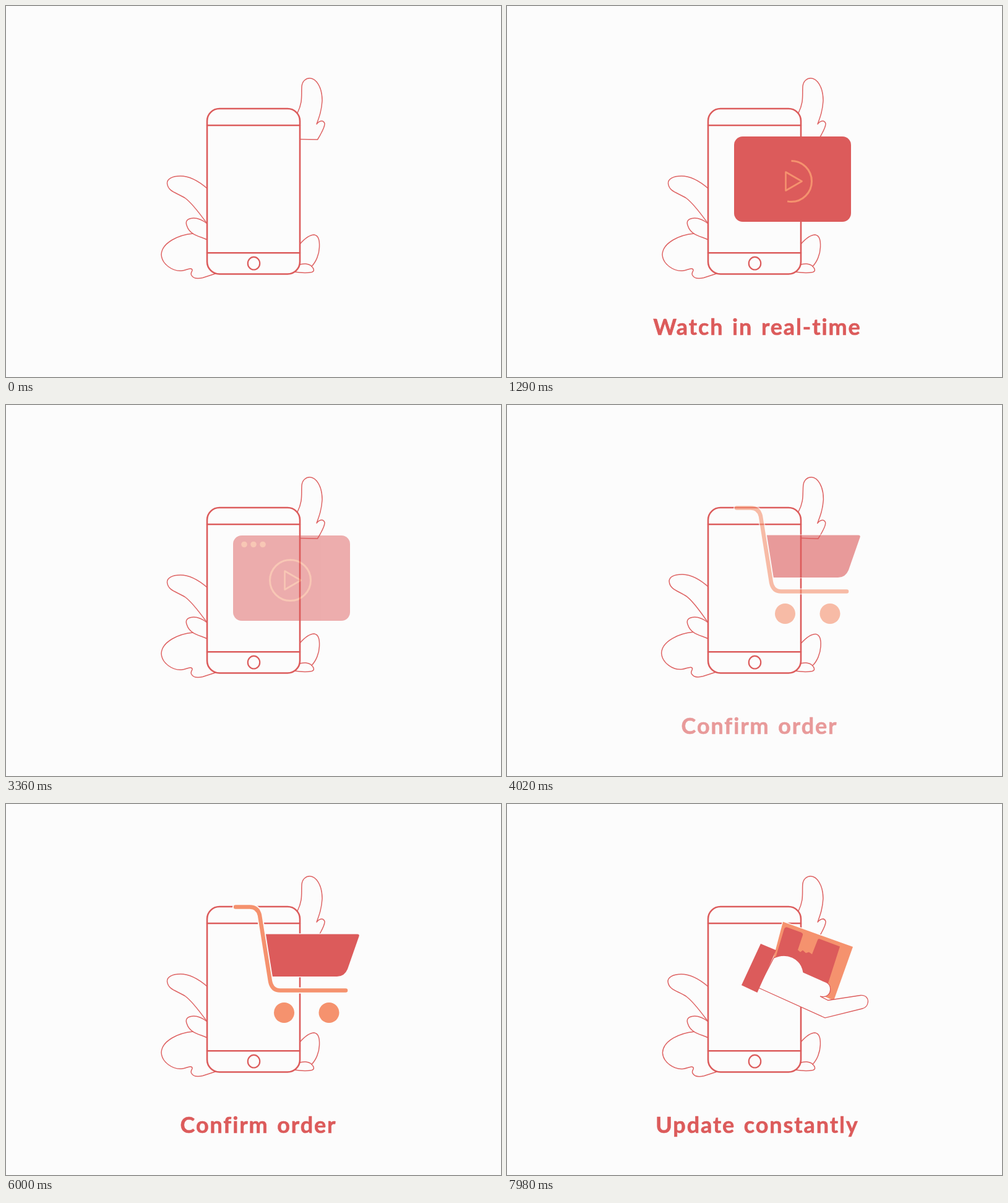
An HTML page for the animation above (8000 ms loop, 800x600 px).

```html
<!DOCTYPE html>
<html lang="en">
<head>
<meta charset="utf-8">
<style>
  html, body { margin: 0; width: 100%; height: 100%; overflow: hidden; background: #fcfcfc; }
  svg { display: block; width: 800px; height: 600px; }
  .line { fill: none; stroke: #de6363; stroke-linejoin: round; stroke-linecap: round; }
  .leaf { stroke-width: 1.5; }
  .phone { stroke-width: 2.6; stroke: #dc5c5c; }
  .paper { fill: #fcfcfc; }
  .red { fill: #dc5b5b; }
  .orange { fill: #f5926e; }
  .halo { stroke: #fcfcfc; stroke-width: 2.5; paint-order: stroke; }
  .icon { fill: none; stroke: #f5926e; stroke-linejoin: round; }
  text { font: 700 36px Lato, "Open Sans", sans-serif; letter-spacing: 1.9px; word-spacing: 3px;
    text-anchor: middle; fill: #dc5b5b; stroke: #dc5b5b; stroke-width: .6; stroke-linejoin: round; }
</style>
</head>
<body>
<svg viewBox="0 0 800 600">
  <g class="line leaf">
    <path id="topLeaf" d="M471 173C480 155 477 145 478 130C479 121 485 116.8 491 116.8C501 117 511 131 511 153C510 170 506 180 502 191C507 185 513 184 515 190C515.5 196 509 207 503.500 216L475 215.500"/>
    <path id="leftLeaf" d="M325 295C310 282 297 275 282 275C268 275 260 280 260.500 287C262 301 277 302 290 311C302 320 314 337 325 352"/>
    <path d="M325 352C316 345 307 342 299 343.500C291 345 290 350 292.500 356C297 370 312 372 325 378"/>
    <path id="bush" d="M302 368C280 370 252 382 251 402C252 418 270 430 285 428C292 427 300 422 301 427C301 430 298 431 299.500 435C303 442 312 441 318 439.500L338 433"/>
    <path id="rightLeaf" d="M475 385C482 377 490 370 498 370C505 371 507 380 506.500 390C506 402 501 414 494 421"/>
    <path id="sprout" d="M472 419C480 416 489 416 494 421C498 425 499 429 494 430.500C486 432 476 431.500 466 430"/>
  </g>
  <g class="line phone">
    <rect class="paper" x="325" y="166" width="150" height="267.5" rx="20"/>
    <path d="M325 193H475M325 399.200H475"/>
    <ellipse cx="400.500" cy="416.200" rx="9.700" ry="10.300" stroke-width="2.2"/>
  </g>

  <g class="scene">
    <rect class="red" x="367" y="211" width="189" height="138" rx="14"/>
    <g class="icon">
      <path stroke-width="2.6" d="M450.500 268.500L476.500 283.500L450.500 298.500Z"/>
      <path id="ring" stroke-width="3" pathLength="1" stroke-dasharray="1 1" d="M459.500 250.500a33 33 0 0 0 0 66a33 33 0 0 0 0-66"/>
    </g>
    <g class="orange" id="dots">
      <circle cx="385" cy="225.500" r="4.800"/><circle cx="400" cy="225.500" r="4.800"/><circle cx="415" cy="225.500" r="4.800"/>
    </g>
  </g>

  <g class="scene">
    <path id="basket" class="red halo" d="M418.500 210.500H568Q571.500 210.500 570.500 214L552 267Q547 279 535 279H429Z"/>
    <g id="frame" fill="none" stroke-linecap="round">
      <path id="rail" stroke="#fcfcfc" stroke-width="10" d="M371 166.500H394Q407 166.500 410 180L427 287Q430 301.500 443 301.500H549"/>
      <use href="#rail" id="bar"/>
    </g>
    <g id="wheels" class="orange">
      <circle cx="449.500" cy="337.500" r="16.500"/><circle cx="522" cy="337.500" r="16.500"/>
    </g>
  </g>

  <g class="scene" id="hand">
    <path class="orange halo" d="M446 190.500L559 231L528 318L425 270Z"/>
    <path class="red" d="M453 199.500L475 207.500Q479 209 478 212L470 236L474 239.500L478 236.500L483 241L488 239.500L493 243L502 220Q503 217 506 218.500L538 230.500L517 296L430 262L448 202Q449.500 198.500 453 199.500Z"/>
    <path class="paper" stroke="#dc5b5b" stroke-width="1.300" d="M431 249C452 239 475 249 479 272L516 288.500C525 293 524 305 518 309.500C515 312 510 312 506 311L519 317.500L571 309.500C580 308.500 585 315 583 322C582 328 578 330 574 331L514 345.800L406 297Z"/>
    <path class="red" d="M410 226L435 236.500L404.500 305L379 293Z"/>
  </g>

  <text class="label" x="404.500" y="532">Watch in real-time</text>
  <text class="label" x="408" y="532">Confirm order</text>
  <text class="label" x="404.500" y="532">Update constantly</text>
</svg>
<script>
  const LOOP = 8000, FIRST = 180, SCENE = 3600;
  const $ = id => document.getElementById(id);
  const scenes = [...document.querySelectorAll('.scene')];
  const labels = [...document.querySelectorAll('.label')];
  const dots = [...$('dots').children];

  // The bar repeats the rail's shape in its own colour.
  const bar = $('rail').cloneNode();
  bar.removeAttribute('id');
  bar.setAttribute('stroke', '#f5926e');
  bar.setAttribute('stroke-width', 6.5);
  $('bar').replaceWith(bar);

  const ramp = (t, from, to) => Math.min(1, Math.max(0, (t - from) / (to - from)));
  const move = (id, value) => $(id).setAttribute('transform', value);
  const squash = (id, y, s) => move(id, `translate(0 ${y * (1 - s)}) scale(1 ${s})`);

  function sway(t) {
    const w = t > 0 && t < 2220 ? -Math.sin(2 * Math.PI * t / 1110) : 0;
    move('topLeaf', `rotate(${-w} 490 175)`);
    move('leftLeaf', `rotate(${-1.5 * w} 325 350)`);
    move('bush', `translate(${1.4 * w} ${0.7 * w})`);
    move('rightLeaf', `rotate(${-w} 475 420)`);
    move('sprout', `translate(${0.8 * w} 0)`);
  }

  function playCard(t) {
    const turn = ramp(t, 450, 2700) * 5 % 2;
    $('ring').setAttribute('stroke-dashoffset', 1 - turn);
    dots.forEach((dot, i) => dot.setAttribute('opacity', ramp(t, 1500 + i * 150, 1650 + i * 150)));
  }

  function bounceCart(t) {
    const q = t > 540 && t < 1740 ? Math.sin(Math.PI * (t - 540) / 600) ** 2 : 0;
    squash('basket', 363.8, 1 - 0.13 * q);
    squash('frame', 278, 1 - 0.215 * q);
    squash('wheels', 337.5, 1 - 0.09 * q);
  }

  function draw(time) {
    const now = time % LOOP - FIRST;
    const active = Math.floor(now / SCENE);
    const t = now - active * SCENE;
    const leave = active === 0 ? 3060 : 3000;
    scenes.forEach((scene, i) => {
      const on = i === active;
      scene.setAttribute('opacity', on ? ramp(t, 0, 400) * (1 - ramp(t, leave, leave + 240)) : 0);
      labels[i].setAttribute('opacity', on ? ramp(t, 0, 400) * (1 - ramp(t, 2880, 3090)) : 0);
    });
    sway(active < 0 ? 0 : t);
    playCard(t);
    bounceCart(t);
    move('hand', `translate(${3 * (1 - ramp(t, 0, 550)) ** 2} 0)`);
  }

  const start = performance.now();
  function tick() {
    draw(performance.now() - start);
    requestAnimationFrame(tick);
  }
  tick();
</script>
</body>
</html>
```
